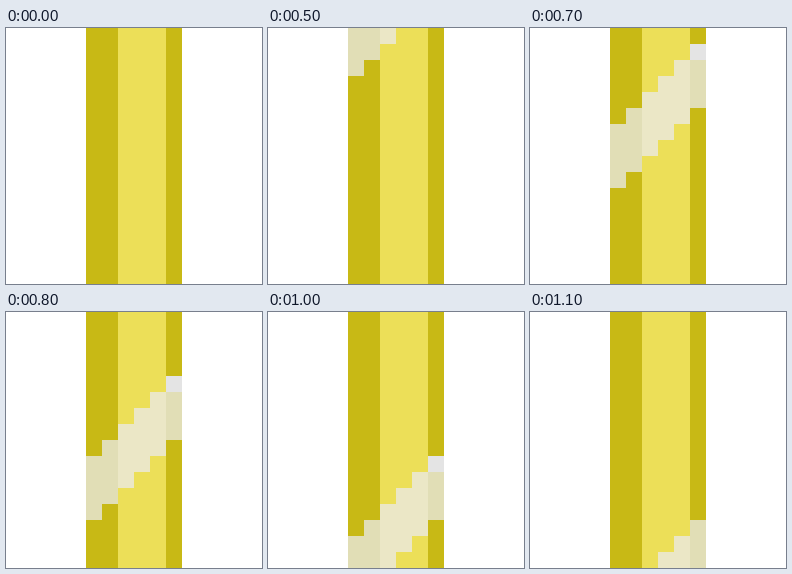
Animation, 256 px wide and 256 px high, one loop 1200 ms. Source, as an HTML page:

```html
<!DOCTYPE html>
<html lang="en">
<head>
<meta charset="utf-8">
<title>Gold bar shine</title>
<style>
  html, body { margin: 0; width: 100%; height: 100%; overflow: hidden; background: #fff; }
  svg { display: block; width: 100vw; height: 100vh; }
  .dark { fill: #c8b915; }
  .light { fill: #ecdf58; }
  .shine-dark { fill: #e1deb6; }
  .shine-light { fill: #ebe7c6; }
  .shine { animation: sweep 1.2s step-end infinite; }
  .tip { fill: #e4e4e4; animation: tip 1.2s step-end infinite; }

  /* Offsets in 16-unit cells, held for 100 ms each after a 500 ms rest */
  @keyframes sweep {
    0% { transform: translateY(-160px); }
    41.6667% { transform: translateY(-16px); }
    50% { transform: translateY(48px); }
    58.3333% { transform: translateY(96px); }
    66.6667% { transform: translateY(144px); }
    75% { transform: translateY(192px); }
    83.3333% { transform: translateY(224px); }
    91.6667%, 100% { transform: translateY(288px); }
  }
  @keyframes tip {
    0% { fill: #e4e4e4; }
    91.6667%, 100% { fill: #e1deb6; }
  }
</style>
</head>
<body>
<svg viewBox="0 0 256 256" shape-rendering="crispEdges">
  <rect class="dark" x="80" width="96" height="256"/>
  <rect class="light" x="112" width="48" height="256"/>
  <g class="shine">
    <path class="shine-dark" d="M80 0h16v-16h16v64h-16v16h-16zM160-80h16v64h-16z"/>
    <path class="shine-light" d="M112-32h16v-16h16v-16h16v64h-16v16h-16v16h-16z"/>
    <rect class="tip" x="160" y="-80" width="16" height="16"/>
  </g>
</svg>
</body>
</html>
```
